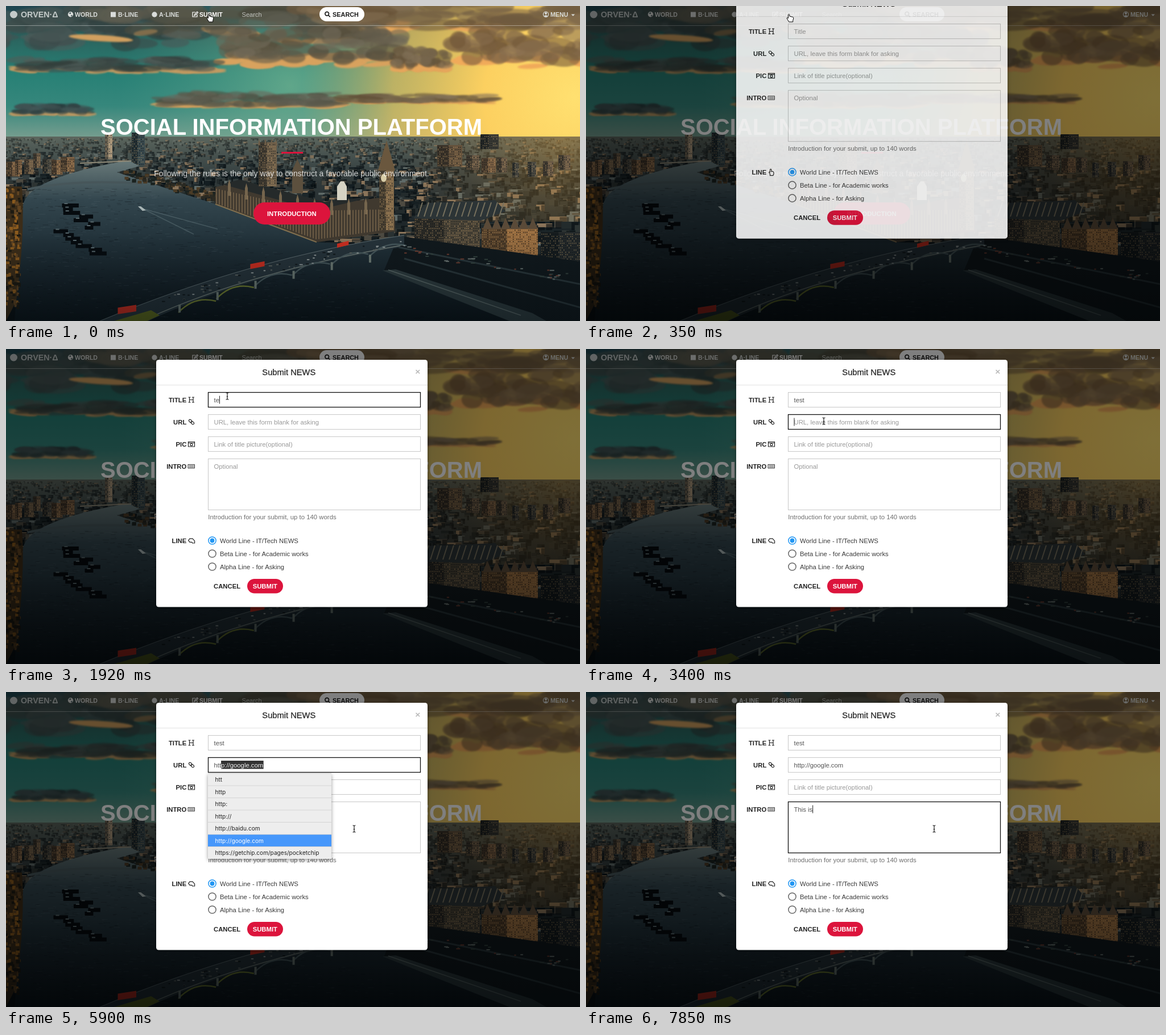
Write an HTML page with a canvas that moves like this. It is 1009x555 px and loops after 8000 ms.

```html
<!DOCTYPE html>
<html lang="en">
<head>
<meta charset="utf-8">
<title>Submit form</title>
<style>
html, body { margin: 0; width: 100%; height: 100%; overflow: hidden; background: #0a1013; }
canvas, svg { position: absolute; left: 0; top: 0; width: 1009px; height: 555px; }
text { font: 11.3px "Liberation Sans", Arial, sans-serif; white-space: pre; }
.b, .label { font-weight: 700; }
.label { fill: #222; text-anchor: end; }
.nav { color: #d9dcda; }
.nav text { font-size: 10.6px; font-weight: 700; fill: currentColor; }
.ln { fill: none; stroke: currentColor; stroke-width: 1.2; }
.hint { fill: #999; }
.val { fill: #555; }
.menu text { font: 10.1px Inter, Roboto, sans-serif; }
.field { fill: #fff; fill-opacity: .6; stroke: #c8c8c8; }
.field.on { stroke: #111; stroke-width: 1.3; }
.mid { text-anchor: middle; }
</style>
</head>
<body>
<canvas id="photo" width="1009" height="555"></canvas>
<svg viewBox="0 0 1009 555">
  <defs>
    <filter id="soft"><feDropShadow dx="0" dy="2" stdDeviation="3" flood-opacity=".4"/></filter>
  </defs>

  <g class="nav">
    <path d="M0 34.5H1009" stroke="#fff" stroke-opacity=".38"/>
    <circle cx="13.5" cy="15" r="6.5" fill="#c3cac9"/>
    <text x="26" y="20" style="font-size:14.3px;fill:#c3cac9">ORVEN·Δ</text>
    <circle cx="113.5" cy="14.8" r="4.7" fill="currentColor"/>
    <path d="M110 13l4-2v3zM114 16h3l-2 3z" fill="#3b5256"/>
    <text x="121" y="18.5">WORLD</text>
    <rect x="184" y="10.5" width="9" height="9" fill="currentColor"/>
    <text x="197" y="18.5">B·LINE</text>
    <circle cx="261" cy="15" r="4.7" fill="currentColor"/>
    <text x="269" y="18.5">A·LINE</text>
    <g color="#fff">
      <path class="ln" d="M333 11h-5v8h8v-4M331 17l1-3 4-4 1.500 1.500-4 4z"/>
      <text x="340" y="18.5">SUBMIT</text>
    </g>
    <text x="414.5" y="18.5" style="font-weight:400;font-size:11.1px;opacity:.8">Search</text>
    <rect x="551" y="2" width="79" height="25" rx="12.5" fill="#fff"/>
    <g color="#1a1a1a">
      <path class="ln" d="M566.500 16l3.300 3.300M567.500 13.700a3.300 3.300 0 1 0-6.600 0a3.300 3.300 0 1 0 6.600 0" style="stroke-width:1.7"/>
      <text x="574" y="18.5" style="font-size:10.9px">SEARCH</text>
    </g>
    <circle class="ln" cx="949" cy="14.8" r="4.6"/>
    <path d="M945.800 17.600q3.200-3 6.400 0l-3.200 1.600zM947 13a2 2 0 1 1 4 0a2 2 0 1 1-4 0" fill="currentColor"/>
    <text x="957" y="18.5">MENU</text>
    <path d="M993.500 14.500h6.500l-3.250 3.300z" fill="currentColor"/>
  </g>

  <g class="mid" fill="#fff">
    <text class="b" x="501.5" y="227" style="font-size:40px">SOCIAL INFORMATION PLATFORM</text>
    <rect x="484" y="257" width="38" height="3" fill="#dc143c"/>
    <text x="502" y="300" style="font-size:13.9px" fill-opacity=".8">Following the rules is the only way to construct a favorable public environment.</text>
    <rect x="435" y="346" width="135" height="39" rx="19.5" fill="#dc143c"/>
    <text class="b" x="502.3" y="369.5">INTRODUCTION</text>
  </g>

  <rect id="shade" width="1009" height="555"/>

  <g id="modal">
    <rect x="264" y="19" width="477" height="435.5" rx="4.5" fill="#fff" filter="url(#soft)"/>
    <text class="mid" x="497.3" y="46.3" fill="#222" stroke="#222" stroke-width=".25" style="font-size:14.7px">Submit NEWS</text>
    <text class="b mid" x="723.7" y="45" fill="#bbb" style="font-size:15.5px">×</text>
    <path d="M264 63.5H741" stroke="#e2e2e2"/>
    <g id="form"></g>
    <g color="#222">
      <path class="ln" d="M322.500 85v9M329 85v9M322.500 89.500H329M320.500 85h4M327 85h4M320.500 94h4M327 94h4"/>
      <g class="ln" transform="translate(326 128.5) rotate(42)">
        <rect x="-5.5" y="-2" width="6" height="4" rx="2"/>
        <rect x="-.5" y="-2" width="6" height="4" rx="2"/>
      </g>
      <path class="ln" d="M320.500 163.500h11v8.500h-11zM320.500 165.500h11M324 168.500a2 2 0 1 1 4 0a2 2 0 1 1-4 0"/>
      <path class="ln" d="M320 203.500h11.500v6.500h-11.500zM321.500 205.700h9M321.500 208h9" style="stroke-width:.9"/>
      <path class="ln" id="hand"/>
    </g>
    <rect id="mark" y="121" height="14.5" fill="#333"/>
    <text id="picked" y="132.5" fill="#f2f2f2"></text>
    <rect id="caret" width="1" height="14" fill="#222"/>

    <text x="355.3" y="300" fill="#6e6e6e" style="font-size:11.4px">Introduction for your submit, up to 140 words</text>
    <g id="radios" fill="#3a3a3a"></g>
    <text class="b" x="365" y="422" fill="#222">CANCEL</text>
    <rect x="424" y="405" width="63" height="25.5" rx="12.75" fill="#dc143c"/>
    <text class="b mid" x="455.3" y="422" fill="#fff">SUBMIT</text>
    <g class="menu" id="menu">
      <rect x="355" y="143.5" width="217" height="150.5" rx="2" fill="#ededed" filter="url(#soft)"/>
      <g id="rows"></g>
    </g>
  </g>

  <g id="cursor" stroke-linejoin="round">
    <path data-kind="hand" d="M-1.500-6q1-1.500 2.200 0v3l6 1.500q2 .5 0 6V7H-.3L-4 .5q0-2 2.500 0z" fill="#fff" stroke="#000"/>
    <path data-kind="arrow" d="M0 0V11.500l2.700-2.400 1.800 4 1.900-.9-1.700-3.900H8.300z" fill="#000" stroke="#fff" stroke-width=".9"/>
    <path data-kind="beam" d="M-2.500-6Q0-6 0-4.500Q0-6 2.500-6M0-5V5M-2.500 6Q0 6 0 4.500Q0 6 2.500 6M-1.200.8h2.400" fill="none" stroke="#222" stroke-width="1.200"/>
  </g>
</svg>

<script>
const $ = id => document.getElementById(id);
const clamp = (v, a = 0, b = 1) => Math.min(b, Math.max(a, v));

// ---------- backdrop: a city by a river at dusk ----------
const c = $('photo').getContext('2d');
let seed = 11;
const rnd = (a = 0, b = 1) => {
  seed = (seed * 16807) % 2147483647;
  return a + (b - a) * seed / 2147483647;
};
const pick = (...list) => list[Math.floor(rnd(0, list.length))];
const times = (n, fn) => { for (let i = 0; i < n; i++) fn(i); };
const rgb = (...v) => `rgb(${v})`;

function fade(g, ...colors) {
  colors.forEach((color, i) => g.addColorStop(i / (colors.length - 1), color));
  return g;
}
const down = (y0, y1, ...colors) => fade(c.createLinearGradient(0, y0, 0, y1), ...colors);
const glow = (x, y, r, ...colors) => fade(c.createRadialGradient(x, y, 0, x, y, r), ...colors);

function rect(color, x, y, w, h) {
  c.fillStyle = color;
  c.fillRect(x, y, w, h);
}
function shape(color, d) {
  c.fillStyle = color;
  c.fill(new Path2D(d));
}
function line(color, width, d) {
  c.strokeStyle = color;
  c.lineWidth = width;
  c.stroke(new Path2D(d));
}
// Dark billows over a sunlit lower edge, warmer towards the right.
function cloud(x, y, w, h, lit = .5) {
  const warm = clamp(x / 900);
  const puff = (color, dy, k) => {
    c.fillStyle = color;
    c.beginPath();
    c.ellipse(x + rnd(-w, w), y + dy, rnd(.06, .2) * w + 5, rnd(.1, .3) * h * k + 1.5, rnd(-.12, .12), 0, 7);
    c.fill();
  };
  times(60 * lit, () => puff(rgb(180 + 60 * warm, 150 + 20 * warm, 100 - 10 * warm), h * rnd(.35, .85), .7));
  times(60, () => {
    const v = rnd(-18, 18);
    puff(`rgba(${[50 + 78 * warm + v, 72 + 30 * warm + v, 76 - 6 * warm + v]},.6)`, h * rnd(-.9, .5), 1.3);
  });
}
function block(color, x, y, w, h) {
  rect(color, x, y, w, h);
  rect('rgba(8,14,18,.45)', x, y, w * .45, h);
  for (let j = y + 3; j < y + h - 2; j += 4)
    for (let i = x + 1; i < x + w - 1; i += 3)
      rect(pick('rgba(210,170,110,.35)', 'rgba(10,16,20,.5)'), i, j, 1.5, 2);
}

function sky() {
  rect(down(0, 235, '#1d4450', '#2b655f', '#278075', '#36877c', '#7a9f90'), 0, 0, 1009, 235);
  rect(glow(500, 140, 300, 'rgba(130,190,150,.6)', 'rgba(90,160,140,0)'), 0, 0, 1009, 235);
  rect(glow(1000, 160, 480, '#ffe070', '#fcd060', 'rgba(232,190,92,.75)', 'rgba(200,180,110,0)'), 0, 0, 1009, 235);
  c.filter = 'blur(1.5px)';
  cloud(130, 45, 210, 42, 0);
  cloud(420, 30, 260, 40, .1);
  cloud(800, 18, 270, 32, .1);
  cloud(540, 75, 160, 36, .6);
  cloud(730, 95, 45, 20, 1);
  cloud(930, 75, 140, 38, .2);
  cloud(190, 105, 170, 13);
  cloud(430, 166, 150, 14);
  cloud(720, 164, 130, 7, .3);
  cloud(80, 183, 65, 9);
  c.filter = 'none';
}

function city() {
  rect(down(230, 555, '#4e5c59', '#30393a', '#1c2427', '#10181b', '#090f12'), 0, 230, 1009, 325);
  for (let y = 233; y < 425; y += 3) {
    const s = 1 + (y - 230) / 40;
    times(120 / s, () => {
      const x = rnd(-10, 1009), w = rnd(2, 7) * s;
      rect(pick('#141e22', '#1c2629', '#232b2c', '#2d3433', '#4d4a41', '#8a745a', '#5f6a68'), x, y, w, rnd(1, 3) * s);
      rect('rgba(6,12,16,.6)', x + w * .6, y + 1, w * .4, 3 * s);
    });
  }
  rect(down(230, 300, 'rgba(110,115,100,.45)', 'rgba(60,70,70,0)'), 0, 230, 1009, 70);
  rect(glow(980, 225, 300, 'rgba(190,140,60,.5)', 'rgba(130,100,60,0)'), 0, 230, 1009, 150);
  times(14, i => block(pick('#6b5a46', '#7d6144', '#4c4a42'), i < 7 ? i * 16 : 620 + i * 27, rnd(256, 278), rnd(10, 26), 26));
  block('#a5947b', 174, 224, 13, 46);
  block('#3a4a4e', 221, 223, 23, 58);
  block('#3a3a34', 834, 226, 32, 26);
  block('#65523c', 758, 245, 44, 38);
}

function river() {
  shape(down(270, 555, '#6a7b7b', '#33464e', '#22323a', '#17232a', '#0c151a'),
    'M215 272Q40 302 30 350L15 555H885L665 465 690 425 545 416 368 349 195 293 235 282Z');
  times(700, () => {
    const y = rnd(320, 550);
    rect(pick('rgba(120,140,145,.12)', 'rgba(0,8,12,.22)'), rnd(35, 240 + (y - 320) * 2.2), y, rnd(2, 12), 1);
  });
  line('rgba(140,160,165,.28)', 1.5, 'M240 357L372 393M240 357L330 402');
  shape('#a9b5b5', 'M232 353h5l9 7-6 1z');
  line('#8f8a78', 2, 'M130 277L220 273');
  line('#47565a', 4, 'M38 323Q120 305 240 313');
  times(14, i => {
    const x = 92 + i % 7 * 9 + rnd(-10, 10), y = 348 + i * 6.5;
    rect('#060b0f', x, y, rnd(12, 30), 7);
    rect('#56666b', x + 4, y - 1, 6, 2);
  });
  shape('#3c2d19', 'M0 318H28Q34 400 18 520L0 555Z');
  times(150, () => rect(pick('#8a5a1e', '#1d1a12', '#5f4322'), rnd(-5, 22), rnd(320, 530), rnd(3, 7), rnd(3, 7)));
  times(90, () => {
    const x = rnd(205, 370);
    rect(pick('#2b2a22', '#1b2320', '#4a3b26'), x, 292 + (x - 205) * .26 + rnd(-8, 10), 7, 5);
  });
}

function palace() {
  shape('#40392f', 'M368 319L400 312 545 352 655 338 684 372V397L548 416 368 349Z');
  shape('#252a2a', 'M380 314L410 306 560 345 655 334 545 360Z');
  for (let x = 370; x < 684; x += 5) {
    const left = Math.min(x, 546), back = Math.max(0, x - 546);
    const y = 322 + (left - 370) * .22 - back * .02;
    line('rgba(190,158,110,.45)', 1.5, `M${x} ${y}V${y + 26 + (left - 370) * .14 - back * .12}`);
    if (x % 30 < 5) shape('#75654d', `M${x} ${y + 8}V${y - 12}l2.500-9 2.500 9v20z`);
  }
  line('#82704f', 2, 'M368 349L546 416');
  block('#70604a', 444, 240, 32, 78);
  for (const x of [443, 454, 465, 473]) shape('#70604a', `M${x} 245l2-12 2 12z`);
  shape('#5c503e', 'M503 330V290l9-20 10 20v40z');
  shape('#d6d3c4', 'M582 342V318l6-9h6l5 9v24z');
  block('#80694a', 656, 285, 26, 110);
  shape('#6a573e', 'M654 290l6-22 9-31 9 31 6 22z');
  shape('#d9cda8', 'M659 303a5 7 0 1 1 10 0a5 7 0 1 1-10 0');
  block('#4b4437', 718, 372, 115, 56);
  shape('#2c3436', 'M716 374L740 347 860 342 878 362 835 378Z');
  for (let x = 724; x < 870; x += 11) line('#77715e', 2, `M${x} 371l8-25`);
  block('#94693d', 836, 391, 99, 57);
  for (let x = 838; x < 930; x += 16) shape('#5a4a38', `M${x} 393l8-20 9 20z`);
  block('#24292a', 940, 398, 69, 54);
}

function bridge() {
  shape('#11191d', 'M690 405L1009 450V555H885L665 465Z');
  shape('#2f3d40', 'M662 466L685 464 925 541 950 555H885Z');
  line('#5b6968', 1.5, 'M672 465L905 545');
  line('#2a373b', 3, 'M700 445L1009 531M690 425L1009 490');
  // Points of the upper deck edge.
  const deck = t => [(1 - t) ** 2 * 165 + 2 * t * (1 - t) * 430 + t * t * 700,
    (1 - t) ** 2 * 555 + 2 * t * (1 - t) * 444 + t * t * 404];
  shape('#26333a', 'M165 555Q430 444 700 404V424Q430 470 250 555Z');
  line('#5a686c', 1.2, 'M165 555Q430 444 700 404');
  line('#6c7874', 1.3, 'M250 550Q430 468 700 421');
  times(6, i => {
    const [x, y] = deck(.26 + i * .125);
    line(i < 2 ? '#6f7c30' : '#46575b', 2.5, `M${x} ${y + 38 - i * 2}q28-30 66-20`);
    rect('#6d7a74', x, y + 24, 4, 14);
  });
  shape('#5c681d', 'M190 555L255 536l15 9-22 10z');
  times(60, () => {
    const [x, y] = deck(rnd(.2, 1));
    rect(pick('#899293', '#11181b', '#59605e'), x, y + rnd(3, 18), rnd(2, 6), 2);
  });
  for (const t of [.09, .52, .8]) {
    const [x, y] = deck(t), w = 34 - 17 * t;
    shape('#c92e20', `M${x - w / 2} ${y - 4}l${w}-5v${w * .35}l${-w} 5z`);
  }
  times(40, () => {
    const x = rnd(700, 990);
    rect(pick('#6d3c30', '#66706e', '#34433f'), x, 425 + (x - 700) * .17 + rnd(-5, 12), rnd(3, 8), 2);
  });
  rect(down(400, 555, 'rgba(2,8,12,0)', 'rgba(2,8,12,.45)'), 0, 400, 1009, 155);
}
[sky, city, river, palace, bridge].forEach(draw => draw());

// ---------- form ----------
const fields = [
  ['title', 'TITLE', 'Title'],
  ['url', 'URL', 'URL, leave this form blank for asking'],
  ['pic', 'PIC', 'Link of title picture(optional)'],
  ['intro', 'INTRO', 'Optional']
];
const lines = ['World Line - IT/Tech NEWS', 'Beta Line - for Academic works', 'Alpha Line - for Asking'];
const links = ['htt', 'http', 'http:', 'http://', 'http://baidu.com', 'http://google.com',
  'https://getchip.com/pages/pocketchip'];
const LEFT = 365.5, ROW = 21.5, CHOICE = 5;
const fieldTop = i => 76.5 + 39 * i;
const label = (s, y) => `<text class="label" x="317.3" y="${y}">${s}</text>`;

$('form').innerHTML = fields.map(([id, name, hint], i) => {
  const y = fieldTop(i);
  return `<rect class="field" id="f-${id}" x="355.5" y="${y}" width="373" height="${id === 'intro' ? 90 : 26}"/>
    ${label(name, y + 17)}
    <text class="hint" id="h-${id}" x="${LEFT}" y="${y + 17}">${hint}</text>
    <text class="val" id="v-${id}" x="${LEFT}" y="${y + 17}"></text>`;
}).join('') + label('LINE', 341.5);

$('radios').innerHTML = lines.map((s, i) => {
  const y = 337.5 + 23 * i;
  return `<circle cx="362.5" cy="${y}" r="6.6" fill="none" stroke="${i ? '#666' : '#2196f3'}" stroke-width="1.5"/>
    <circle cx="362.5" cy="${y}" r="${i ? 0 : 3.9}" fill="#2196f3"/>
    <text x="376" y="${y + 4}">${s}</text>`;
}).join('');

$('rows').innerHTML = links.map((s, i) => {
  const y = 143.5 + ROW * i;
  return `<g><rect x="355" y="${y}" width="217" height="${ROW}" fill="#4697fb"/>
    <path d="M355 ${y}h217" stroke="#cfcfcf" stroke-width=".8"/>
    <text x="367.5" y="${y + 14.5}">${s}</text></g>`;
}).join('');

// ---------- timeline ----------
const LOOP = 8000, KEY = 148;
const OPEN = 216, TYPE_TITLE = 1770, TYPE_URL = 4290, ARROWS = 4715, ENTER = 6050, TYPE_INTRO = 6940;
const focusAt = { title: 980, url: 2950, intro: 6500 };
const typed = (s, from, t) => s.slice(0, clamp(Math.floor((t - from) / KEY) + 1, 0, s.length));

// Each move: start, end, place reached, pointer shown from the start on.
const moves = [
  [0, 1, 357, 21, 'hand'],
  [620, 980, 389, 83, 'beam'],
  [2440, 2850, 418, 127, 'beam'],
  [3600, 3900, 417, 170, 'beam'],
  [TYPE_URL, TYPE_URL + 1, 417, 170, 'arrow'],
  [5400, 5880, 612, 241, 'beam']
];
function pointer(t) {
  let [, , x, y, kind] = moves[0];
  for (const [from, to, x1, y1, k] of moves) {
    if (t < from) break;
    const p = clamp((t - from) / (to - from)), e = p * p * (3 - 2 * p);
    x += (x1 - x) * e;
    y += (y1 - y) * e;
    kind = k;
  }
  return { x, y, kind };
}

const finger = 'M-5.500-2.500h3l2-1.700q2 0 1 1.700h4a1.200 1.200 0 0 1 0 2.400h-3q1 3-1.300 4h-3.100l-2.500-1z';
const fist = 'M-5.300-.8l2.300-3h5l3.600 4v3.800h-4l-.8-1.600h-3.800l-1.300-1.800z';
const poses = [[finger, -90], [finger, 0], [fist, 0]];

const set = (el, attrs) => { for (const k in attrs) el.setAttribute(k, attrs[k]); };
const show = (el, on) => set(el, { visibility: on ? 'inherit' : 'hidden' });
const width = id => $(id).getComputedTextLength();

function render(t) {
  // The opening is shown in held steps of 200 ms.
  const held = Math.floor((t + 50) / 200) * 200 - 50;
  const slide = 1 - (1 - clamp((held - OPEN) / 300)) ** 1.5;
  set($('shade'), { opacity: .5 * clamp((held - OPEN + 150) / 150) });
  set($('modal'), { opacity: clamp((held - OPEN) / 155), transform: `translate(0 ${-109 * (1 - slide)})` });

  const text = {
    title: typed('test', TYPE_TITLE, t),
    url: t < ENTER ? typed('htt', TYPE_URL, t) : links[CHOICE],
    intro: typed('This is', TYPE_INTRO, t)
  };
  const focus = Object.keys(focusAt).findLast(id => t >= focusAt[id]);
  for (const id in text) {
    $('v-' + id).textContent = text[id];
    show($('h-' + id), !text[id]);
    $('f-' + id).classList.toggle('on', id === focus);
  }

  const row = t < ARROWS ? -1 : Math.min(CHOICE, Math.floor((t - ARROWS) / KEY));
  const open = t >= TYPE_URL && t < ENTER;
  show($('menu'), open);
  [...$('rows').children].forEach((g, i) => {
    show(g.children[0], i === row);
    set(g.children[2], { fill: i === row ? '#fff' : '#222' });
  });

  const rest = open && row > 0 ? links[row].slice(3) : '';
  const end = LEFT + width('v-url');
  $('picked').textContent = rest;
  set($('picked'), { x: end });
  set($('mark'), { x: end, width: rest ? width('picked') + .5 : 0 });

  show($('caret'), focus && !rest);
  if (focus) {
    const i = fields.findIndex(f => f[0] === focus);
    set($('caret'), { x: LEFT + width('v-' + focus), y: fieldTop(i) + 6 });
  }

  const [d, turn] = poses[Math.floor(t / 665) % 3];
  set($('hand'), { d, transform: `translate(326 338) rotate(${turn})` });

  const { x, y, kind } = pointer(t);
  set($('cursor'), { transform: `translate(${x} ${y})` });
  for (const el of $('cursor').children) show(el, el.dataset.kind === kind);
}

const start = performance.now();
function tick() {
  render((performance.now() - start) % LOOP);
  requestAnimationFrame(tick);
}
tick();
</script>
</body>
</html>
```
